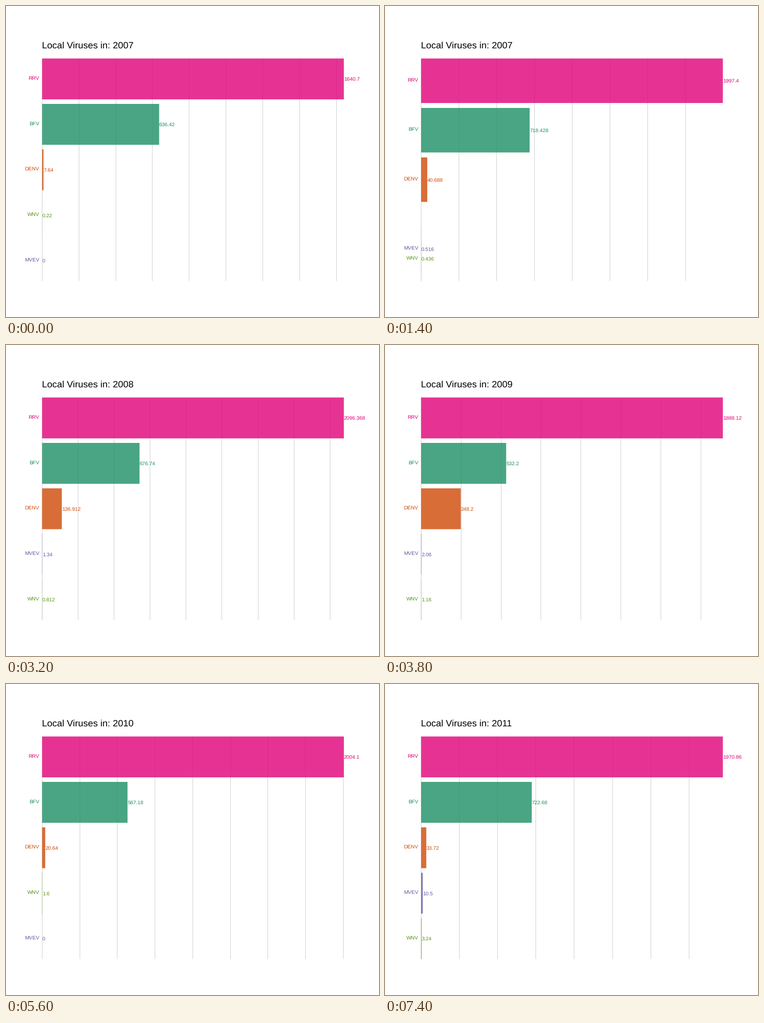
A matplotlib script that plays this animation: 820 px wide and 683 px high, repeating every 8 s.

```python
import math

import matplotlib.pyplot as plt
from matplotlib.animation import FuncAnimation
from matplotlib.collections import LineCollection
from matplotlib.patches import Rectangle

plt.rcParams["font.family"] = "Liberation Sans"
plt.rcParams["text.hinting"] = "none"

WIDTH, HEIGHT, DPI = 820, 683, 100
PX = 72 / DPI                      # points per pixel
LEFT, SPAN = 79.4, 663.3           # bar area, horizontally
TOP, BOTTOM = 115.3, 604.0         # bar area, vertically
HALF = 0.45                        # half a bar, in ranks
FONT, TITLE_FONT = 11.38, 20.5     # pixels
CAP = 0.715 * FONT                 # height of capitals and digits
INTERVAL, FRAMES = 200, 40
FIRST_YEAR = 2007

COLORS = {
    "RRV": "#e00078",
    "BFV": "#1c8f64",
    "DENV": "#cf4905",
    "WNV": "#539713",
    "MVEV": "#6158a2",
}
CASES = {
    "RRV": (1640.7, 2235.2, 1888.12, 2004.1, 1970.86),
    "BFV": (636.42, 773.1, 532.2, 567.18, 722.68),
    "DENV": (7.64, 62.72, 248.2, 20.64, 33.72),
    "WNV": (0.22, 0.58, 1.16, 1.6, 3.24),
    "MVEV": (0, 0.86, 2.06, 0, 10.5),
}
# (first frame, number of steps) of each move to the next year
MOVES = [(5, 5), (15, 5), (25, 4), (34, 4)]


def ranks_in(year):
    order = sorted(CASES, key=lambda name: -CASES[name][year])
    return {name: i + 1 for i, name in enumerate(order)}


RANKS = [ranks_in(year) for year in range(len(MOVES) + 1)]


def mix(a, b, p):
    return a + (b - a) * p


def state_at(frame):
    """Index of the year being left and the progress to the next one."""
    year, progress = 0, 0.0
    for i, (start, steps) in enumerate(MOVES):
        if frame >= start:
            year, progress = i, min(1.0, (frame - start + 1) / steps)
    return year, progress


# The small margin keeps the pixel size from being rounded down.
fig = plt.figure(figsize=((WIDTH + 0.01) / DPI, (HEIGHT + 0.01) / DPI),
                 dpi=DPI, facecolor="white")
ax = fig.add_axes([0, 0, 1, 1])
ax.set_xlim(0, WIDTH)
ax.set_ylim(HEIGHT, 0)
ax.axis("off")

grid = LineCollection([], colors="#cccccc", linewidths=PX, snap=False, zorder=1)
ax.add_collection(grid, autolim=False)
title = ax.text(LEFT, 92.5, "", fontsize=TITLE_FONT * PX, color="black")

bars, labels, values = {}, {}, {}
for name, color in COLORS.items():
    bars[name] = ax.add_patch(Rectangle((LEFT, TOP), 0, 0, facecolor=color, alpha=0.8,
                                        linewidth=0, snap=False, zorder=2))
    style = dict(color=color, fontsize=FONT * PX, va="baseline", zorder=3)
    labels[name] = ax.text(LEFT - 0.556 * FONT, 0, name, ha="right", **style)
    values[name] = ax.text(LEFT, 0, "", ha="left", **style)


def draw(frame):
    year, p = state_at(frame)
    cases = {n: mix(CASES[n][year], CASES[n][year + 1], p) for n in CASES}
    ranks = {n: mix(RANKS[year][n], RANKS[year + 1][n], p) for n in CASES}
    top_value = max(cases.values())
    x_unit = SPAN / top_value
    y_unit = (BOTTOM - TOP) / (max(ranks.values()) - 1 + 2 * HALF)

    step = 200 if top_value < 1700 else 250
    columns = [math.floor(LEFT + k * step * x_unit) + 0.5
               for k in range(int(top_value // step) + 1)]
    grid.set_segments([[(x, TOP), (x, BOTTOM)] for x in columns])

    for name, count in cases.items():
        width = count * x_unit
        y = TOP + (ranks[name] - 1 + HALF) * y_unit
        bars[name].set_bounds(LEFT, y - HALF * y_unit, width, 2 * HALF * y_unit)
        labels[name].set_y(y + 0.2 * CAP)
        values[name].set_position((LEFT + width, y + 0.5 * CAP))
        values[name].set_text(f"{round(count, 6):.10g}")

    title.set_text(f"Local Viruses in: {FIRST_YEAR + year + (p > 0.7)}")
    return [grid, title, *bars.values(), *labels.values(), *values.values()]


anim = FuncAnimation(fig, draw, frames=FRAMES, interval=INTERVAL,
                     init_func=lambda: draw(0), repeat=True, repeat_delay=0)
plt.show()
```
